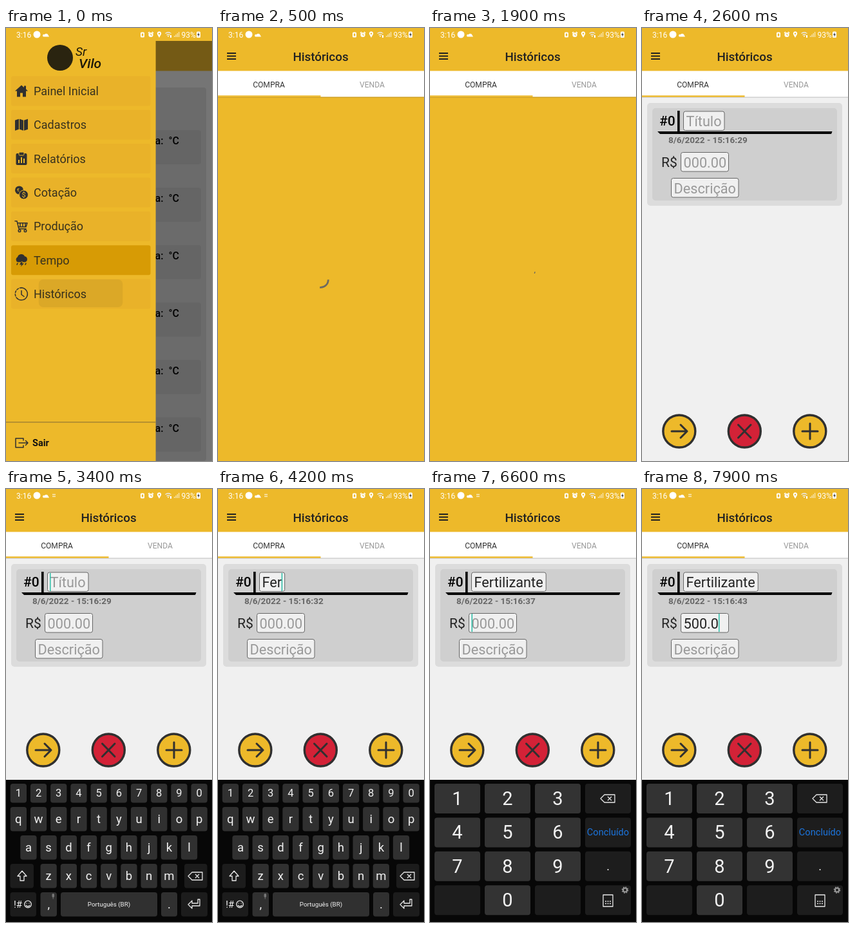
An HTML page that plays this animation: 320x670 px, repeating every 8000 ms.

```html
<!DOCTYPE html>
<html lang="pt-BR">
<head>
<meta charset="utf-8">
<style>
html, body { margin: 0; width: 100%; height: 100%; overflow: hidden; background: #edb92a; }
svg { display: block; width: 320px; height: 670px; font-family: Roboto, Arial, sans-serif; }
text { white-space: pre; }
.line { fill: none; stroke: #303030; stroke-width: 1.5; stroke-linecap: round; stroke-linejoin: round; }
.up text { text-transform: uppercase; }
</style>
</head>
<body>
<svg id="stage" viewBox="0 0 320 670"></svg>
<script>
const YELLOW = '#edb92a', DARK = '#303030', LOOP = 8000;

const rect = (x, y, w, h, fill, r = 0, more = '') =>
  `<rect x="${x}" y="${y}" width="${w}" height="${h}" fill="${fill}" rx="${r}" ${more}/>`;
const text = (x, y, size, str, fill = '#222', more = '') =>
  `<text x="${x}" y="${y}" font-size="${size}" fill="${fill}" ${more}>${str}</text>`;
const mid = 'text-anchor="middle"';
const path = (d, more = 'class="line"') => `<path d="${d}" ${more}/>`;
const circle = (x, y, r, more) => `<circle cx="${x}" cy="${y}" r="${r}" ${more}/>`;
const group = (id, body) => `<g id="${id}">${body}</g>`;
const solid = `fill="${DARK}"`;
const white = 'fill="#fff"';
const thin = 'fill="none" stroke="#e8e8e8" stroke-width="1.3" stroke-linejoin="round"';

// Weather page lying under the drawer
function weather() {
  let s = rect(0, 20, 320, 650, '#f0f0f0') + rect(0, 20, 320, 46.4, YELLOW) + rect(8, 92, 303, 578, '#dcdcdc', 4);
  for (let i = 0; i < 6; i++) {
    const y = 158 + i * 88.9;
    s += rect(16, y, 287, 53, '#cfcfcf', 4) + text(231.5, y + 22, 16, 'a:  °C', '#000', 'font-weight="500"');
  }
  return s;
}

// Menu icons, drawn around 0,0
const icons = [
  path('M-10 0L0-9L4-5.5V-8H7V-3L10 0H7V9H2V3H-2V9H-7V0Z', solid),
  path('M-10-7L-4-9V7L-10 9ZM-3-9L3-7V9L-3 7ZM4-7L10-9V7L4 9Z', solid),
  rect(-8.5, -8, 17, 18, DARK, 2) + rect(-4, -10, 8, 5, DARK, 1.5, `stroke="${YELLOW}"`) +
    path('M-4 7V2M0 7V-2M4 7V0', `stroke="${YELLOW}" stroke-width="2"`),
  circle(-3.5, -3.5, 6.5, solid) + circle(3.5, 3.5, 7, `fill="${DARK}" stroke="${YELLOW}"`) +
    text(3.5, 7.5, 11, '$', YELLOW, mid) + text(-5, -1, 8, '€', YELLOW, mid),
  path('M-10-8H-7L-4 4H7M-6-5H9L7 1H-5M-2-5V1M2-5V1M6-5V1') + circle(-3, 7, 1.8, 'class="line"') + circle(6, 7, 1.8, 'class="line"'),
  path('M-6 3A4.5 4.5 0 0 1-6-5A6 6 0 0 1 5-6A4.7 4.7 0 0 1 6 3ZM0 2L-3 7H0L-1 10L4 5H1L2 2Z', solid) +
    path('M-6 5L-7 7M7 5L6 7'),
  path('M0-9.5A9.5 9.5 0 1 1-6 7.5M0-5V1L4 4') + path('M-6 7.5A9.5 9.5 0 0 1 0-9.5', 'class="line" stroke-dasharray="3 2.2"'),
];

function drawer() {
  let s = rect(0, 0, 232.6, 670, YELLOW) +
    circle(84, 46, 20, 'fill="#2a2410"') +
    text(108, 43, 19, 'Sr', '#1c1808', 'font-style="italic"') +
    text(113, 62, 21, 'Vilo', '#1c1808', 'font-style="italic" font-weight="500"');
  ['Painel Inicial', 'Cadastros', 'Relatórios', 'Cotação', 'Produção', 'Tempo', 'Históricos'].forEach((name, i) => {
    const y = 97.4 + i * 52.35;
    s += rect(8, y - 23, 216.5, 46, '#e9b229', 3, `id="item${i}"`) +
      `<g transform="translate(24 ${y})">${icons[i]}</g>` + text(43, y + 6.5, 18, name, '#38321e');
  });
  return s + rect(51, 389, 130, 43, '#000', 7, 'id="ripple" opacity=".06"') +
    rect(0, 609.3, 232.6, 1.3, '#9a7d32') +
    path('M27 638V635H15V649H27V646M20 642H34M30.5 638.5L34 642L30.5 645.5') +
    text(41, 647, 14.5, 'Sair', '#111', 'font-weight="700"');
}

function header() {
  return rect(0, 0, 320, 67, YELLOW) + path('M14 39H28M14 43.5H28M14 48H28', 'stroke="#222" stroke-width="2"') +
    text(159.5, 51, 18.8, 'Históricos', '#222', mid + ' font-weight="500"') +
    rect(0, 106, 320, 2, '#00000022') + rect(0, 66.4, 320, 40.1, '#fff') + rect(0, 104.4, 159.5, 2.4, YELLOW) +
    text(79, 91.5, 12.1, 'COMPRA', '#333', mid) + text(239.5, 91.5, 12.1, 'VENDA', '#999', mid);
}

function status() {
  return text(16, 14.5, 12, '3:16', '#fff') + circle(48, 10, 5.5, white) +
    path('M58 13.5A2 2 0 0 1 60 10A3 3 0 0 1 65 10L67 13.5Z', white) +
    path('M72 8.5H77M72 11.5H77', 'id="kbIcon" stroke="#fff" stroke-opacity=".7" stroke-width="1.5"') +
    rect(209, 6.5, 6, 8, '#fff', 1.5) + rect(210.8, 8.5, 2.5, 4, YELLOW) +
    circle(225, 10.5, 3.6, white) + path('M221 8L223 6M229 8L227 6', 'stroke="#fff" stroke-width="1.5"') +
    path('M225 8.5V11H227', `fill="none" stroke="${YELLOW}"`) +
    path('M238 15L235.2 10A3.2 3.2 0 1 1 240.8 10Z', white) + circle(238, 8.7, 1.2, `fill="${YELLOW}"`) +
    path('M247.5 8.5Q252 5 256.5 8.5M249.5 11Q252 9 254.5 11', thin) + path('M252 14L250.7 12H253.3ZM255 11H257V15H255Z', white) +
    path('M261.7 14V12M264 14V10M266.3 14V8M268.6 14V6', 'stroke="#fff" stroke-opacity=".6" stroke-width="1.4"') +
    text(272.5, 14.5, 12, '93%', '#fff') + rect(296, 5.5, 6, 9.5, '#fff', 1.5) +
    path('M299.8 6.5L297 10.8H299L298.2 14L301 9.5H299Z', solid);
}

const field = (id, x, y, w, str) =>
  rect(x, y, w, 29.5, '#f0f0f0', 3, `id="${id}Box" stroke="#666"`) + text(x + 4, y + 23, 21.7, str, '#999', `id="${id}"`);

function form() {
  return rect(8, 116, 303, 159, '#dcdcdc', 5) + rect(16, 124, 287, 143, '#cfcfcf', 5) +
    text(27, 151, 21, '#0', '#000', 'font-weight="500"') + rect(55, 128, 3.6, 32, '#000') +
    path('M24 160H295.5L294 164H28Z', 'fill="#000"') +
    text(41, 178, 13.5, '', '#666', 'id="date" font-weight="700"') + text(30, 215, 21, 'R$') +
    field('title', 64.5, 129, 64, 'Título') + field('price', 60.5, 192.5, 74, '000.00') +
    field('desc', 45.5, 232.5, 104.5, 'Descrição') + rect(0, 0, 1.5, 28, '#2bbfa8', 0, 'id="caret"');
}

const fab = (x, fill, d) => circle(x, 404, 25, `fill="${fill}" stroke="${DARK}" stroke-width="3.4"`) +
  path(d, `fill="none" stroke="${DARK}" stroke-width="3" stroke-linecap="round" stroke-linejoin="round"`);

const key = (x, y, w, h, fill, label = '', size = 18.5, color = '#f2f2f2') =>
  rect(x, y, w, h, fill, 4, `data-key="${label}"`) + text(x + w / 2, y + h / 2 + size * .34, size, label, color, mid);
const backspace = (x, y) => path(`M${x - 11} ${y}L${x - 5} ${y - 6}H${x + 11}V${y + 6}H${x - 5}ZM${x} ${y - 3}L${x + 6} ${y + 3}M${x + 6} ${y - 3}L${x} ${y + 3}`, thin);

function letters() {
  const row = (str, x, y, h, size) => [...str].map((c, i) => key(x + i * 31.2, y, 25.3, h, '#303030', c, size)).join('');
  return rect(0, 450, 320, 220, '#070707') + row('1234567890', 6.7, 456, 29.5, 16.5) +
    group('caps', row('qwertyuiop', 6.7, 492, 37.5) + row('asdfghjkl', 22.3, 536, 37.5) + row('zxcvbnm', 53.5, 580, 37.5)) +
    key(6.5, 580, 36.5, 37.5, '#1c1c1c') + path('M25 591L18 599H22V606H28V599H32Z', thin) +
    key(277, 580, 35.5, 37.5, '#1c1c1c') + backspace(294, 599) +
    key(6.5, 624, 40.5, 37.5, '#1c1c1c') + text(12, 648, 15, '!#', '#f2f2f2') +
    circle(34, 642.5, 5.3, thin) + path('M31 644Q34 648 37 644M32 640.5V641.5M36 640.5V641.5', thin) +
    key(53.5, 624, 25.5, 37.5, '#303030', ',') + rect(71.5, 626, 3.5, 6, '#777', 1.7) + path('M73.2 632V634.5', 'stroke="#777"') +
    key(85, 624, 150, 37.5, '#303030', 'Português (BR)', 9.8) + key(241, 624, 25, 37.5, '#303030', '.') +
    key(272, 624, 41, 37.5, '#1c1c1c') + path('M283 643L289 637V641H298V635H301V645H289V649Z', thin);
}

function numbers() {
  let s = rect(0, 450, 320, 220, '#070707');
  ['1', '2', '3', '', '4', '5', '6', 'Concluído', '7', '8', '9', '.', '', '0', '', ''].forEach((c, i) => {
    const digit = c >= '0' && c <= '9', word = c.length > 1;
    s += key(7 + i % 4 * 78, 456 + (i >> 2) * 52.4, 71, 46, digit ? '#333' : '#1d1d1d', c,
      digit ? 29 : word ? 14.6 : 18, word ? '#1c74dc' : '#f2f2f2');
  });
  return s + backspace(276, 479) + path('M269 628H284V646H269Z', thin) +
    path('M272 638H281M272 641.5H281', 'stroke="#e8e8e8" stroke-width="1.6" stroke-dasharray="2 1.5"') +
    circle(303, 620.5, 3, 'fill="none" stroke="#999" stroke-width="2.2"') +
    circle(303, 620.5, 4.6, 'fill="none" stroke="#999" stroke-width="1.5" stroke-dasharray="1.8 1.8"');
}

const stage = document.getElementById('stage');
stage.innerHTML =
  group('page', rect(0, 0, 320, 670, YELLOW, 0, 'id="back"') +
    path('', 'id="spin" fill="none" stroke="#6d6a60" stroke-width="2.8"') + group('form', form()) +
    group('fabs', group('extra',
      fab(57.8, YELLOW, 'M46 404H70M60 394L70 404L60 414') +
      fab(159.3, '#d32237', 'M149.5 394L169 414M169 394L149.5 414')) +
      fab(260.8, YELLOW, 'M249 404H273M261 392V416')) + header()) +
  group('weather', weather()) + rect(0, 20, 320, 650, '#000', 0, 'id="shade"') +
  group('drawer', drawer()) + rect(0, 0, 320, 20, YELLOW) +
  group('letters', letters()) + group('numbers', numbers()) + status();

const $ = id => document.getElementById(id);
const show = (id, on) => { $(id).style.display = on ? '' : 'none'; };
const set = (id, attrs) => { for (const a in attrs) $(id).setAttribute(a, attrs[a]); };
const clamp = v => Math.max(0, Math.min(1, v));
const ease = v => v * v * (3 - 2 * v);
const easeOut = v => 1 - (1 - v) ** 3;

// Keystroke times and the clock seconds they leave on the form
const typing = {
  title: { word: 'Fertilizante', hint: 'Título', left: 68, top: 130,
    at: [4000, 4100, 4200, 4300, 4400, 4500, 4700, 4800, 4900, 5000, 5100, 5300],
    secs: [31, 32, 32, 33, 33, 34, 34, 35, 35, 36, 36, 37] },
  price: { word: '500.0', hint: '000.00', left: 64.5, top: 193,
    at: [6900, 7000, 7200, 7300, 7500], secs: [41, 41, 42, 42, 43] },
};

function spinner(t) {
  const turn = (t - 1900) / 500, n = Math.floor(turn), p = turn - n;
  const base = -78 + 255 * n + .428 * (t - 1900);
  const a = base + 255 * ease(clamp(p * 2 - 1)), b = base + 7 + 255 * ease(clamp(p * 2));
  const at = deg => `${159.5 + 11.7 * Math.cos(deg * Math.PI / 180)} ${389.7 + 11.7 * Math.sin(deg * Math.PI / 180)}`;
  set('spin', { d: `M${at(a)}A11.7 11.7 0 ${b - a > 180 ? 1 : 0} 1 ${at(b)}` });
}

function fillForm(t, focus) {
  let sec = 29, pressed = '';
  for (const id in typing) {
    const { word, hint, left, top, at, secs } = typing[id];
    const n = at.filter(v => v <= t).length;
    if (n) sec = secs[n - 1];
    if (at[n] - t <= 80) pressed = word[n].toLowerCase();
    $(id).textContent = n ? word.slice(0, n) : hint;
    set(id, { fill: n ? '#222' : '#999' });
    const width = $(id).getComputedTextLength();
    if (id === 'title') set('titleBox', { width: width + 8.5 });
    if (id === focus) set('caret', { x: left + (n ? width : 0), y: top });
  }
  $('date').textContent = `8/6/2022 - 15:16:${sec}`;
  for (const k of stage.querySelectorAll('[data-key]'))
    k.style.fill = pressed && k.dataset.key === pressed ? '#5a5a5a' : '';
}

function draw(t) {
  const slide = easeOut(clamp((t - 200) / 300));
  const loading = t < 2000, editing = t >= 2500, numeric = t >= 6600;
  set('drawer', { transform: `translate(${-234 * slide} 0)` });
  set('shade', { opacity: .51 * (1 - slide) });
  show('weather', t < 200);
  show('ripple', t < 300);
  const grow = 43 * clamp(t / 200);
  set('ripple', { x: 51 - grow, width: 130 + grow * 2 });
  set('item5', { fill: t < 200 ? '#d79b05' : '#e9b229' });
  set('item6', { fill: t < 200 ? '#e9b229' : '#d79b05' });

  set('back', { fill: loading ? YELLOW : '#f0f0f0' });
  show('spin', loading && t >= 300);
  if (loading) spinner(t);
  show('form', editing);
  show('fabs', !loading);
  show('extra', editing);
  set('fabs', { transform: `translate(0 ${t < 3100 ? 220 : 0})` });
  show('kbIcon', t >= 3000);
  show('caret', t >= 3000);
  show('letters', t >= 3000 && !numeric);
  show('numbers', numeric);
  set('letters', { transform: `translate(0 ${220 * (1 - easeOut(clamp((t - 3000) / 300)))})` });
  $('caps').classList.toggle('up', t >= 3850 && t < 4000);
  if (editing) fillForm(t, numeric ? 'price' : 'title');
}

const begin = performance.now();
function tick() {
  draw((performance.now() - begin) % LOOP);
  requestAnimationFrame(tick);
}
tick();
</script>
</body>
</html>
```
